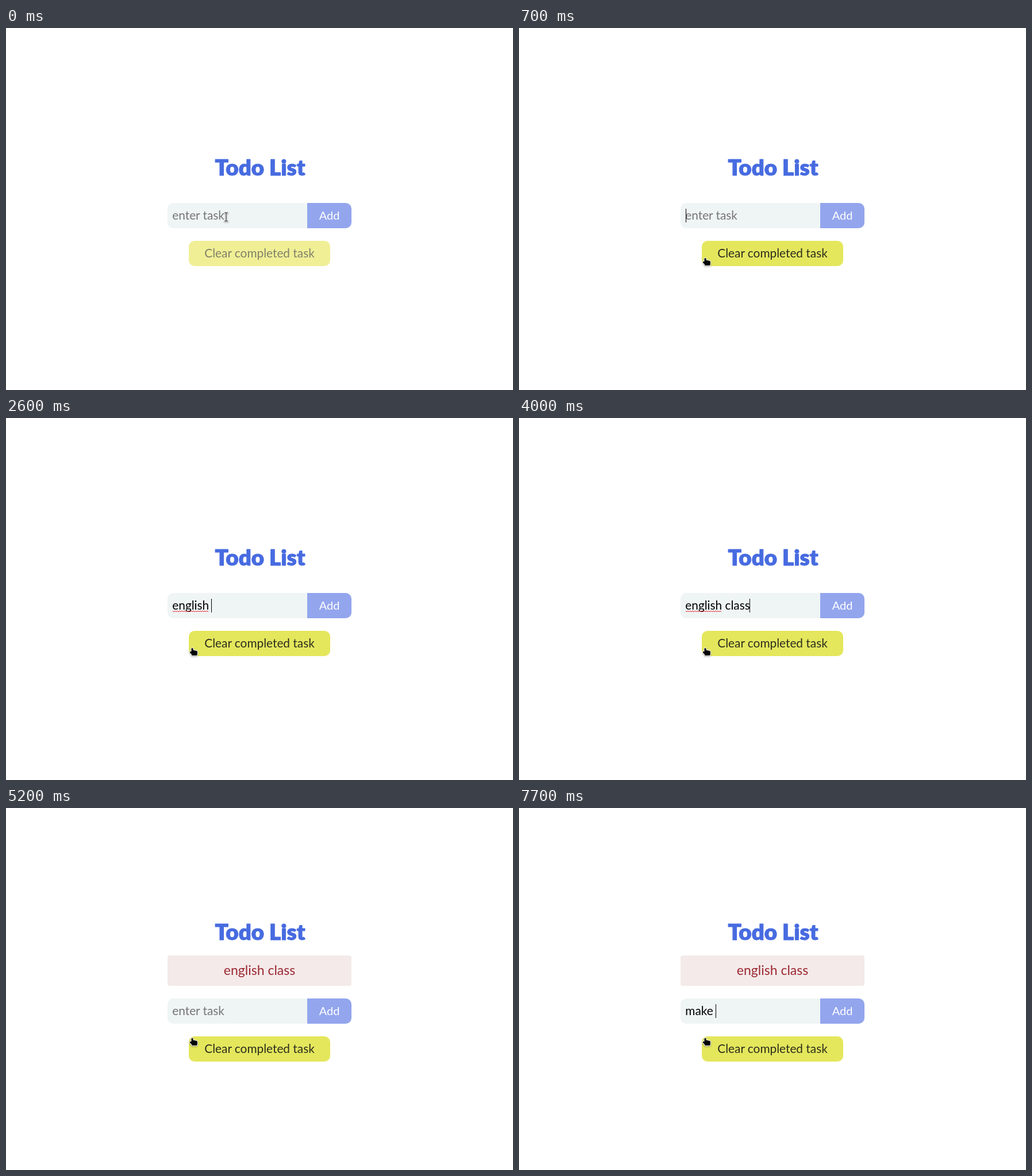
An HTML page for the animation above (8000 ms loop, 882x631 px).

```html
<!DOCTYPE html>
<html lang="en">
<head>
<meta charset="utf-8">
<title>Todo List</title>
<style>
  html, body { margin: 0; width: 100%; height: 100%; overflow: hidden; background: #fff; }
  svg { display: block; width: 100%; height: 100%; }
  text { font: 20.8px Lato, sans-serif; white-space: pre; stroke-linejoin: round; }
  .mid { text-anchor: middle; }
  #title { font-size: 38.5px; font-weight: 900; fill: #476be0; stroke: #476be0; stroke-width: 1; }
  #item text { font-size: 23px; fill: #9c2932; }
  #add { font-size: 20px; fill: #fff; }
  .outlined { stroke: #fff; stroke-width: 2; stroke-linejoin: round; paint-order: stroke;
    filter: drop-shadow(0 1px 1px #0006); }
</style>
</head>
<body>
<svg viewBox="0 0 882 631">
  <text id="title" class="mid" x="442" y="256.5">Todo List</text>
  <g id="item">
    <rect x="281" y="257" width="320" height="53" rx="4" fill="#f4eaea"/>
    <text class="mid" x="441" y="291">english class</text>
  </g>
  <g id="form">
    <path d="M524 305H291a10 10 0 0 0-10 10v24a10 10 0 0 0 10 10H524z" fill="#eff5f5"/>
    <path d="M524 305h67a10 10 0 0 1 10 10v24a10 10 0 0 1-10 10h-67z" fill="#93a5ed"/>
    <text id="add" class="mid" x="562.5" y="334">Add</text>
    <text id="entry" x="289.3" y="334"></text>
    <path id="squiggle" fill="none" stroke="#e8202a"/>
    <rect id="caret" y="315" width="1" height="24"/>
    <rect id="button" x="318" y="371" width="246" height="44" rx="10"/>
    <text id="label" class="mid" x="441" y="400">Clear completed task</text>
  </g>
  <path id="beam" class="outlined" d="M-3-8h2.5l.5.5.5-.5H3v1H.5V6.5H3v1H.5L0 7l-.5.5H-3v-1h2.500V-7H-3z"/>
  <path id="hand" class="outlined" d="M-3.500-5Q-2-7-.5-5V-2.500L6-1Q7-.5 7 1V4L6 7H-3V5L-6 2V0H-3.500z"/>
</svg>
<script>
const LOOP = 8000, SHIFT_AT = 4500;
const $ = id => document.getElementById(id);

// [start, typed text, caret x (0 = hidden)]
const typing = [
  [0, '', 0], [200, '', 290], [900, '', 0],
  [1000, 'e', 300], [1200, 'en', 311], [1500, 'eng', 322], [1900, 'engl', 327],
  [2000, 'engli', 332], [2300, 'englis', 341], [2500, 'english', 352],
  [2600, 'english ', 357], [3200, 'english c', 367], [3400, 'english cl', 372],
  [3500, 'english cla', 384], [3800, 'english clas', 393], [4000, 'english class', 401],
  [SHIFT_AT, '', 290], [5200, '', 0], [5800, '', 290],
  [6200, 'm', 306], [6400, 'ma', 317], [6600, 'mak', 327], [6700, 'make', 337],
  [7300, 'make', 0], [7700, 'make ', 342]
];

// [start, cursor shape, x, y, hover amount]
const pointer = [
  [0, 'beam', 383, 329.5, 0], [200, 'beam', 382, 332, 0],
  [400, 'hand', 352, 398, 0.1], [500, 'hand', 335, 411, 0.5],
  [600, 'hand', 328, 409, 0.85], [700, 'hand', 326, 407, 1]
];

const at = (steps, t) => steps.findLast(step => step[0] <= t);
const show = (id, on) => $(id).setAttribute('visibility', on ? 'visible' : 'hidden');
const place = (id, x, y) => $(id).setAttribute('transform', `translate(${x} ${y})`);
const mix = (from, to, k) => `rgb(${from.map((v, i) => Math.round(v + (to[i] - v) * k))})`;

$('squiggle').setAttribute('d', 'M290 336' + 'l2 2l2-2'.repeat(15) + 'l2 2');

function draw(t) {
  const [, text, caretX] = at(typing, t);
  const [, cursor, x, y, hover] = at(pointer, t);
  const added = t >= SHIFT_AT;

  place('title', 0, added ? -27 : 0);
  place('form', 0, added ? 27 : 0);
  show('item', added);

  $('entry').textContent = text || 'enter task';
  $('entry').setAttribute('fill', text ? '#000' : '#757575');
  show('squiggle', text.startsWith('english '));
  show('caret', caretX);
  $('caret').setAttribute('x', caretX);

  $('button').setAttribute('fill', mix([240, 239, 150], [228, 231, 92], hover));
  $('label').setAttribute('fill', mix([128, 128, 106], [44, 45, 30], hover));
  for (const id of ['beam', 'hand']) show(id, id === cursor);
  place(cursor, x, y);
}

const start = performance.now();
function tick() {
  draw((performance.now() - start) % LOOP);
  requestAnimationFrame(tick);
}
tick();
</script>
</body>
</html>
```
